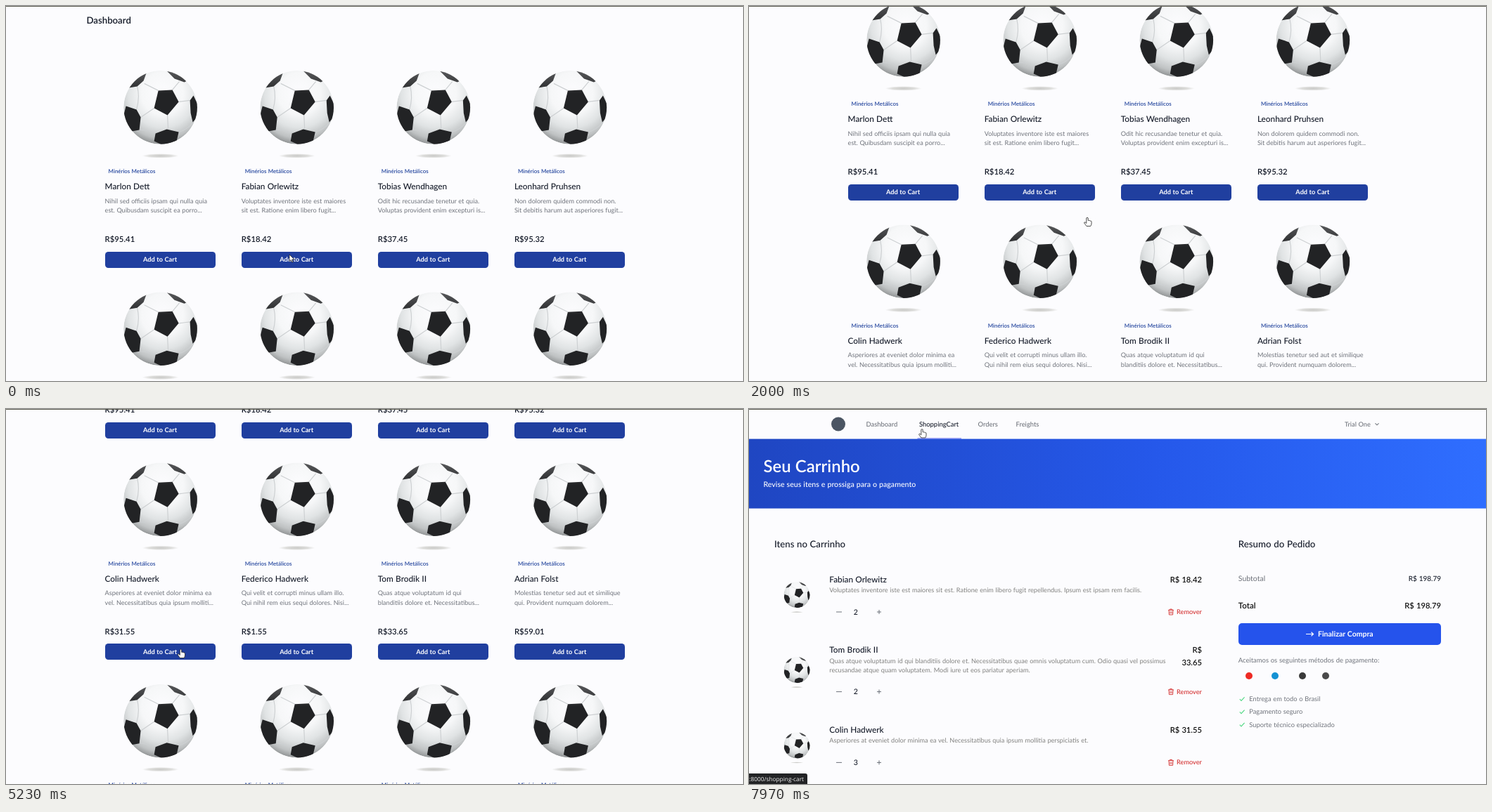
Write an HTML page that moves like this. It is 1048 by 534 pixels and loops after 8000 ms.

```html
<!DOCTYPE html>
<html lang="pt">
<head>
<meta charset="utf-8">
<title>Dashboard</title>
<style>
html, body { margin: 0; width: 100%; height: 100%; overflow: hidden; background: #fcfcfe; }
svg { display: block; font-family: Lato, "Open Sans", sans-serif; word-spacing: .02em; text-rendering: geometricPrecision; }
.status { font-family: "Open Sans", "Noto Sans", sans-serif; word-spacing: 0; }
</style>
</head>
<body>
<svg id="stage" width="1048" height="534" viewBox="0 0 1048 534">
  <defs>
    <radialGradient id="skin" gradientUnits="userSpaceOnUse" cx="3" cy="-20" r="75">
      <stop offset="0" stop-color="#fcfcfe"/>
      <stop offset=".4" stop-color="#f6f7f8"/>
      <stop offset=".65" stop-color="#e0e3e4"/>
      <stop offset=".85" stop-color="#bfc2c3"/>
      <stop offset="1" stop-color="#858889"/>
    </radialGradient>
    <radialGradient id="shade">
      <stop offset="0" stop-color="#c9c9c7"/>
      <stop offset=".6" stop-color="#dcdcda"/>
      <stop offset="1" stop-color="#fcfcfe"/>
    </radialGradient>
    <linearGradient id="patch" gradientUnits="userSpaceOnUse" x1="0" y1="-52" x2="0" y2="-20">
      <stop offset="0" stop-color="#58595b"/>
      <stop offset="1" stop-color="#222325"/>
    </linearGradient>
    <linearGradient id="hero">
      <stop offset="0" stop-color="#1f46c2"/>
      <stop offset=".55" stop-color="#2558ea"/>
      <stop offset="1" stop-color="#2f6eff"/>
    </linearGradient>
    <clipPath id="round"><circle r="52.3"/></clipPath>
    <g id="ball">
      <ellipse cy="69" rx="26" ry="3.2" fill="url(#shade)"/>
      <g clip-path="url(#round)">
        <circle r="52.3" fill="url(#skin)"/>
        <path d="M-9 1L-28 14M10 11L11 31M26-8L42-10M17-25L27-37M-3-24L-23-34M-34 3Q-29-14-33-30M-30 32Q-18 32-7 37M26 35Q38 32 46 22"
          fill="none" stroke="#cdd0d2" stroke-width="1.2"/>
        <path d="M-3-24L17-25L26-8L10 11L-9 1ZM-49-2L-34 3L-28 14L-30 32L-41 34L-53 14ZM-45-28L-37-41L-20-49L-24-38L-33-30ZM8-53L22-52L38-38L34-36L20-41ZM42-10L47-17L54-2L54 12L46 21L43 8ZM-7 37L9 31L26 35L23 48L4 54L-9 48Z"
          fill="url(#patch)"/>
      </g>
    </g>
    <g id="trash" fill="none" stroke="#d32f2f" stroke-width=".9">
      <path d="M-4-2.7H4M-1.5-2.7V-4H1.5V-2.7M-3-2.7L-2.6 4H2.6L3-2.7M-1-.8V2.4M1-.8V2.4"/>
    </g>
  </defs>
  <g id="shop"></g>
  <g id="cart"></g>
  <g id="status">
    <path d="M0 519H80Q83 519 83 522V534H0Z" fill="#222325"/>
    <text class="status" x="78" y="529.5" font-size="8.3" fill="#f2f2f2" text-anchor="end">localhost:8000/shopping-cart</text>
  </g>
  <rect width="1048" height="1" fill="#5d5d50"/>
  <g id="cursor" stroke="#222" stroke-width=".8" stroke-linejoin="round" fill="#fff">
    <path id="arrow" d="M0 0V9.6L2.2 7.6L3.8 11L5.3 10.3L3.8 7L6.9 6.8Z"/>
    <path id="hand" d="M-1.2.9Q0-.6 1.2.9V4.4Q2.2 3.8 2.9 4.7Q4 4.2 4.5 5.1Q6 4.8 6 6.3V9Q5.8 11 4.7 12.5H-1Q-2.6 10.4-4.4 7.9Q-4.4 6.4-2.8 7L-1.2 8.4Z"/>
  </g>
</svg>
<script>
const $ = id => document.getElementById(id);
const INK = '#141a28', GRAY = '#6f737b', BLUE = '#203f9f', NAVY = '#27489f';

const text = (x, y, s, size, fill = INK, weight = 400, anchor = 'start') =>
  `<text x="${x}" y="${y}" font-size="${size}" fill="${fill}" font-weight="${weight}" text-anchor="${anchor}">${s}</text>`;
const box = (x, y, w, h, fill, r = 0) =>
  `<rect x="${x}" y="${y}" width="${w}" height="${h}" rx="${r}" fill="${fill}"/>`;
const ball = (x, y, scale = 1) => `<use href="#ball" transform="translate(${x} ${y}) scale(${scale})"/>`;
const dot = (x, y, r, fill) => `<circle cx="${x}" cy="${y}" r="${r}" fill="${fill}"/>`;
const line = (d, color, width = 1) => `<path d="${d}" fill="none" stroke="${color}" stroke-width="${width}"/>`;

const products = [
  ['Marlon Dett', 'Nihil sed officiis ipsam qui nulla quia', 'est. Quibusdam suscipit ea porro...', '95.41'],
  ['Fabian Orlewitz', 'Voluptates inventore iste est maiores', 'sit est. Ratione enim libero fugit...', '18.42'],
  ['Tobias Wendhagen', 'Odit hic recusandae tenetur et quia.', 'Voluptas provident enim excepturi is...', '37.45'],
  ['Leonhard Pruhsen', 'Non dolorem quidem commodi non.', 'Sit debitis harum aut asperiores fugit...', '95.32'],
  ['Colin Hadwerk', 'Asperiores at eveniet dolor minima ea', 'vel. Necessitatibus quia ipsum molliti...', '31.55'],
  ['Federico Hadwerk', 'Qui velit et corrupti minus ullam illo.', 'Qui nihil rem eius sequi dolores. Nisi...', '1.55'],
  ['Tom Brodik II', 'Quas atque voluptatum id qui', 'blanditiis dolore et. Necessitatibus...', '33.65'],
  ['Adrian Folst', 'Molestias tenetur sed aut et similique', 'qui. Provident numquam dolorem...', '59.01']
];

function card(i) {
  const x = 140.6 + 194.1 * (i % 4), y = 46 + 315.4 * Math.floor(i / 4);
  const p = products[i];
  let out = ball(x + 79, y + 144.4) + text(x + 5, y + 238.2, 'Minérios Metálicos', 7.9, NAVY, 600);
  if (p) out += text(x, y + 261.4, p[0], 11.8, INK, 500)
    + text(x, y + 281, p[1], 9.1, GRAY) + text(x, y + 294.2, p[2], 9.1, GRAY)
    + text(x, y + 336.4, 'R$' + p[3], 11.3, INK, 600)
    + box(Math.round(x), Math.round(y + 350), 157, 23, BLUE, 4.5)
    + text(x + 78.5, y + 364.3, 'Add to Cart', 9.2, '#fff', 700, 'middle');
  return out;
}

const links = [['Dashboard', 166.5], ['ShoppingCart', 242], ['Orders', 325.5], ['Freights', 379.5]];
const nav = (active, id) => dot(127, 21.5, 10, '#4b5563')
  + links.map(([s, x], i) => `<g id="${id}${i}">${text(x, 25, s, 9.4, i === active ? INK : GRAY, 500)}</g>`).join('')
  + text(847, 24.7, 'Trial One', 9.2, GRAY, 500)
  + line('M890.5 20.3L893 22.8L895.5 20.3', GRAY, 1.1);

$('shop').innerHTML = nav(0, 'link')
  + box(164, 41.7, 49, 1.3, '#7f88f6')
  + `<g id="hover">${box(239.5, 41.8, 62.5, 1, '#e2e4e9')}${text(242, 25, 'ShoppingCart', 9.4, '#374151', 500)}</g>`
  + text(114.5, 70.8, 'Dashboard', 13.2, INK, 600)
  + Array.from({ length: 12 }, (_, i) => card(i)).join('');

// Each item: product, name baseline, quantity, quantity row, ball centre, price lines, description lines
const items = [
  [1, 247, 2, 289, 264.7, ['R$ 18.42'], ['Voluptates inventore iste est maiores sit est. Ratione enim libero fugit repellendus. Ipsum est ipsam rem facilis.']],
  [6, 347.4, 2, 402.6, 371.6, ['R$', '33.65'], ['Quas atque voluptatum id qui blanditiis dolore et. Necessitatibus quae omnis voluptatum cum. Odio quasi vel possimus', 'recusandae atque quam voluptatem. Modi iure ut eos pariatur aperiam.']],
  [4, 461, 3, 503.4, 479, ['R$ 31.55'], ['Asperiores at eveniet dolor minima ea vel. Necessitatibus quia ipsum mollitia perspiciatis et.']]
];
const cartItem = ([id, y, count, row, cy, price, about]) => ball(68, cy, .355)
  + text(114.3, y, products[id][0], 11.8, INK, 500)
  + about.map((s, i) => text(114.3, y + 14.3 + i * 13.1, s, 9.15, '#81817f')).join('')
  + price.map((s, i) => text(644, y + i * 18, s, 11.2, '#111', 600, 'end')).join('')
  + line(`M124 ${row}H132M182 ${row}H188M185 ${row - 3}V${row + 3}`, '#5d626b', .9)
  + text(151.8, row + 3.6, count, 10.5, INK, 500, 'middle')
  + `<use href="#trash" x="600" y="${row}"/>` + text(644, row + 3, 'Remover', 9.2, '#d32f2f', 500, 'end');

const perks = ['Entrega em todo o Brasil', 'Pagamento seguro', 'Suporte técnico especializado'];
$('cart').innerHTML = nav(1, 'tab')
  + box(239.5, 41.3, 62.5, 1.4, '#7f88f6')
  + box(0, 42.6, 1048, 99, 'url(#hero)')
  + text(20.5, 90, 'Seu Carrinho', 23.9, '#fff', 600)
  + text(20.5, 111, 'Revise seus itens e prossiga para o pagamento', 10.6, '#fff', 500)
  + text(36, 197, 'Itens no Carrinho', 13.2, INK, 500)
  + text(695.8, 197, 'Resumo do Pedido', 13.3, INK, 500)
  + items.map(cartItem).join('')
  + text(695.8, 245, 'Subtotal', 10.5, GRAY) + text(984, 244.8, 'R$ 198.79', 10, INK, 500, 'end')
  + text(695.8, 284, 'Total', 11.6, '#111', 600) + text(984, 284, 'R$ 198.79', 11.2, '#111', 600, 'end')
  + box(696, 305, 288, 31, '#2553ec', 5)
  + line('M792 320.5H802.5M799.5 317.7L802.5 320.5L799.5 323.3', '#fff', 1.2)
  + text(809, 324, 'Finalizar Compra', 10.5, '#fff', 700)
  + text(695.8, 361, 'Aceitamos os seguintes métodos de pagamento:', 9.45, GRAY)
  + [[711, '#ee2a24'], [748, '#1492d4'], [787, '#3a3a3a'], [820, '#4a4a4a']].map(([x, c]) => dot(x, 380, 5, c)).join('')
  + perks.map((s, i) => line(`M697.8 ${413.2 + i * 18.2}l2.2 2.2l4.6-5`, '#55d987', 1.2)
    + text(711.3, 416.2 + i * 18.2, s, 9.3, GRAY)).join('');

// time, x, y of the pointer tip
const path = [
  [0, 403, 354], [330, 393, 320], [1400, 393, 320], [1830, 478, 302], [2000, 481, 301], [2800, 481, 301],
  [2860, 492, 304], [3000, 530, 314], [3400, 600, 338], [3570, 627, 347], [4170, 627, 347],
  [4970, 249, 343], [5230, 248.5, 342], [6970, 248.5, 342], [7300, 243, 33], [7770, 246, 29], [8000, 246, 28.5]
];
// start, end, from, to
const scrolls = [[30, 300, 46, 142], [3400, 3560, 142, 377], [6970, 7280, 377, 0]];
const HAND_AT = 1700, HOVER_AT = 7250, STATUS_AT = 7500, CART_AT = 7870;

const smooth = k => k < .5 ? 2 * k * k : 1 - 2 * (1 - k) ** 2;
const progress = (t, a, b) => Math.min(1, Math.max(0, (t - a) / (b - a)));
const show = (id, on) => $(id).setAttribute('visibility', on ? 'visible' : 'hidden');

function pointer(t) {
  const i = path.findIndex(p => p[0] > t), [a, x, y] = path[i - 1], [b, u, v] = path[i];
  const k = smooth(progress(t, a, b));
  return [x + (u - x) * k, y + (v - y) * k];
}

function scrollAt(t) {
  let y = scrolls[0][2];
  for (const [a, b, from, to] of scrolls) if (t >= a) y = from + (to - from) * smooth(progress(t, a, b));
  return Math.round(y);
}

function draw(t) {
  const inCart = t >= CART_AT, hovering = t >= HOVER_AT && !inCart;
  $('shop').setAttribute('transform', `translate(0 ${-scrollAt(t)})`);
  $('shop').style.display = inCart ? 'none' : '';
  $('cart').style.display = inCart ? '' : 'none';
  show('hover', hovering);
  show('link1', !hovering);
  show('status', t >= STATUS_AT);
  show('arrow', t < HAND_AT);
  show('hand', t >= HAND_AT);
  $('cursor').setAttribute('transform', `translate(${pointer(t)})`);
}

const start = performance.now();
function tick() {
  draw((performance.now() - start) % 8000);
  requestAnimationFrame(tick);
}
tick();
</script>
</body>
</html>
```
